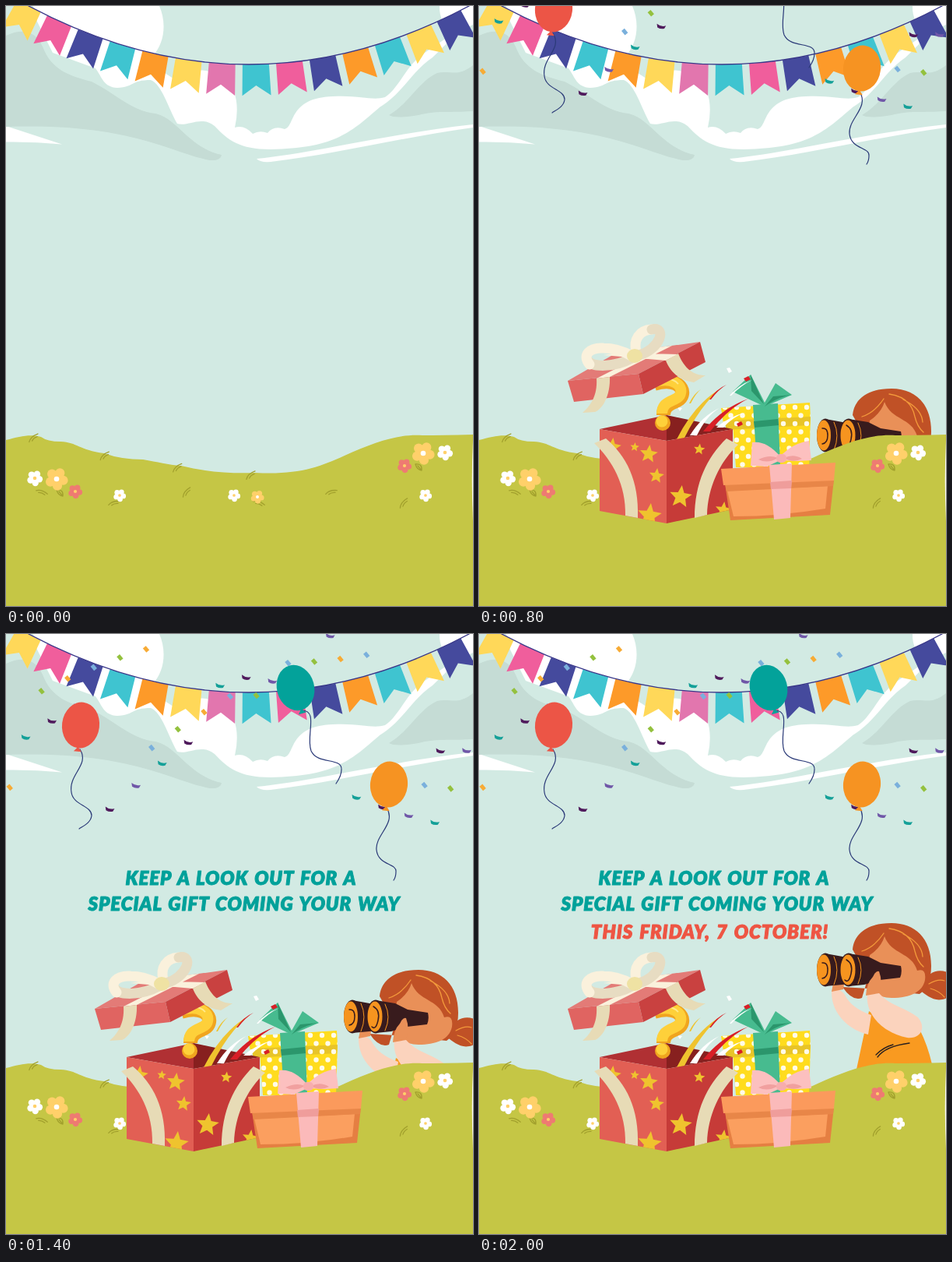
Write an HTML page that moves like this. It is 600 by 770 pixels and loops after 4000 ms.

```html
<!DOCTYPE html>
<html lang="en">
<head>
<meta charset="utf-8">
<title>Gift invitation</title>
<style>
html, body { margin: 0; height: 100%; overflow: hidden; background: #d2eae3; }
svg { display: block; width: 100vw; height: 100vh; }
text { font: italic 900 24px Lato, "Open Sans", sans-serif; letter-spacing: .95px; word-spacing: 2px; text-anchor: middle; stroke-width: 1; stroke-linejoin: round; }
.line { fill: none; stroke-linecap: round; stroke-linejoin: round; }
</style>
</head>
<body>
<svg viewBox="0 0 600 770">
  <defs>
    <clipPath id="boxClip"><path d="M155 543L241 558 326 543V646L241 664 155 648Z"/></clipPath>
    <clipPath id="wrapClip"><path d="M311 516L425 509 426 528 424 592H330L326 536H314Z"/></clipPath>
  </defs>

  <!-- sky -->
  <path fill="#d2eae3" d="M0 0H600V770H0Z"/>
  <g fill="#fff">
    <path d="M35 0H197C206 20 205 48 187 66Q195 82 215 93C240 75 283 80 293 110Q300 130 294 156Q306 152 317 164Q326 159 336 163Q344 153 358 158C372 155 362 118 420 116C455 114 470 122 487 117C505 105 512 80 535 62L600 18V24C580 32 565 50 548 66C520 85 510 112 480 130C440 165 420 182 340 184C300 184 285 172 268 154C250 140 235 155 220 151C208 130 200 100 186 95C160 95 165 104 143 105C125 104 124 92 115 80L60 60 40 20Z"/>
    <path d="M557 0Q556 20 575 38L600 22V0Z"/>
    <path d="M0 154L72 177.500Q36 174 0 174.500Z"/>
    <path d="M322 196C400 188 490 164 600 152V156C500 170 420 191 340 200Q326 201 322 196Z"/>
  </g>
  <g fill="#c5dcd5">
    <path d="M0 38C22 28 38 32 47 52C58 82 82 90 110 97C140 112 162 135 192 138C220 144 235 182 277 191Q276 199 262 198C210 188 160 150 0 155Z"/>
    <path d="M492 140C515 128 532 95 554 86C572 82 580 92 600 76V135C570 137 552 134 530 140Q500 145 492 140Z"/>
  </g>
  <g id="bunting"></g>

  <g id="girl">
    <path fill="#c05126" d="M570 449C576 434 590 429 601 434V467C586 474 576 464 566 457Z"/>
    <path class="line" stroke="#f39a3b" stroke-width="1.200" d="M578 449Q590 442 598 445M580 455Q591 458 598 466"/>
    <path fill="#c05126" d="M467 453Q480 472 492 467L500 440 480 405C482 384 500 371 530 371C560 371 581 390 581 426Q581 452 566 462L500 455Z"/>
    <path fill="#e99058" d="M502 412Q517 402 521 388C530 412 556 408 563 432Q575 428 573 444C570 459 555 467 530 467Q500 466 499 440Z"/>
    <path class="line" stroke="#f39a3b" stroke-width="1.300" d="M520 384Q508 402 492 407M527 378Q555 382 560 407Q563 420 571 427M545 385Q569 397 570 414"/>
    <path fill="#f99a20" d="M501 484Q525 500 562 500Q575 522 582 552V610H474Z"/>
    <path class="line" stroke="#29201f" stroke-width="1.300" d="M512 543Q522 529 553 525M510 540Q520 530 532 527"/>
    <g fill="#fbd3bd">
      <path d="M453 458Q463 453 470 463Q478 480 504 489L500 514C478 509 452 489 453 458Z"/>
      <path d="M499 460Q508 453 514 461C528 477 545 478 564 492C575 505 568 520 550 518C524 513 495 492 499 460Z"/>
    </g>
    <path fill="#e99058" d="M453 459L456 444H470L468 456Z"/>
    <g fill="#381b1d">
      <path d="M445 410L467 414 490 425V446L467 450 445 452Z"/>
      <path d="M475 410L500 414 516 422 542 426Q544 434 541 441L515 444 495 450 475 452Z"/>
      <ellipse cx="445" cy="431" rx="11" ry="21.500"/>
      <ellipse cx="475" cy="431" rx="12" ry="21.500"/>
    </g>
    <g fill="#f6941f">
      <ellipse cx="443" cy="431" rx="9" ry="19.500"/>
      <ellipse cx="474" cy="431" rx="9.500" ry="19.500"/>
    </g>
    <path class="line" stroke="#381b1d" stroke-width="1.500" d="M441 422Q448 421 448 431T441 442M472 418Q481 423 478 436T470 444"/>
    <path class="line" stroke="#f6941f" d="M456 414Q464 431 456 450M487 415Q495 431 487 449"/>
    <path fill="#e99058" d="M497 464Q498 448 506 440Q510 431 514 433Q519 446 514 461Z"/>
  </g>

  <!-- meadow -->
  <path id="hill" fill="#c5c645" d="M0 557C18 552 32 549 45 553Q53 559 70 559C92 560 94 570 126 574Q148 582 176 582C195 585 208 589 225 590C258 598 288 600 320 599C375 602 402 592 435 577C475 559 505 549 535 551Q560 551 600 550V770H0Z"/>
  <path fill="#fff" d="M600 557Q597.500 608 600 661Z"/>
  <g id="meadow"></g>

  <g id="gifts">
    <!-- yellow parcel -->
    <path fill="#ffdc1e" d="M311 516L425 509 426 528 424 592H330L326 536H314Z"/>
    <path fill="#e8c428" d="M315 532L426 527 425 538 318 544Z"/>
    <g id="dots" clip-path="url(#wrapClip)"></g>
    <path fill="#47bb8f" d="M352 512L384 510 387 590H357Z"/>
    <path fill="#2b966c" d="M353 533L384 530 385 538 354 541Z"/>
    <path fill="#47bb8f" d="M349 473L326 495 367 514 402 499 381 484 367 509Z"/>
    <path fill="#2b966c" d="M349 473L350 494 366 511ZM402 499Q383 502 367 514L378 501Z"/>

    <!-- open box -->
    <path fill="#b03033" d="M155 543L241 525V558Z"/>
    <path fill="#87201f" d="M241 525L326 543 241 558Z"/>
    <g id="streamers"></g>
    <g class="line" style="stroke-linecap: butt">
      <path stroke="#f0a51f" stroke-width="18" d="M225 485C250 477 263 488 261 498C259 511 237 506 237 525"/>
      <path stroke="#fed03a" stroke-width="14" d="M224 483C249 475 262 487 259 497C257 508 235 504 235 523"/>
      <path stroke="#ffe98a" stroke-width="2" d="M229 479Q246 475 256 485"/>
    </g>
    <circle cx="236" cy="535" r="10" fill="#f0a51f"/>
    <circle cx="235" cy="533" r="7.500" fill="#fed03a"/>
    <path fill="#e25f54" d="M155 543L241 558V664L155 648Z"/>
    <path fill="#c63b38" d="M241 558L326 543V646L241 664Z"/>
    <g id="stars" fill="#efc32e" clip-path="url(#boxClip)"></g>
    <g fill="#e7dbb6">
      <path d="M148 561L163 555C189 577 206 609 204 657L188 654C189 615 172 584 148 561Z"/>
      <path d="M333 563L318 555C293 579 277 612 277 657L293 653C294 618 309 585 333 563Z"/>
    </g>

    <!-- lid -->
    <path fill="#e37b77" d="M114 481L175 446 284 431 205 472Z"/>
    <path fill="#e06461" d="M114 481L205 472 211 498 122 508Z"/>
    <path fill="#c94140" d="M205 472L284 431 291 457 211 498Z"/>
    <path fill="#faf1dc" d="M151 478L230 438 248 436 168 476ZM160 448L178 445 256 447 240 455Z"/>
    <g fill="#e7dbb6">
      <path d="M151 478L168 476C169 500 159 517 149 521L133 522C148 509 152 494 151 478Z"/>
      <path d="M240 455L256 446C264 466 276 474 291 474L276 483C257 480 246 470 240 455Z"/>
    </g>
    <g class="line" stroke-width="13">
      <path stroke="#e7dcc2" d="M196 452C174 464 145 464 140 455"/>
      <path stroke="#faf1dc" d="M142 460C132 448 142 438 160 439Q178 439 196 449"/>
      <path stroke="#faf1dc" d="M202 444C198 428 206 416 222 415"/>
      <path stroke="#e7dcc2" d="M222 415C242 411 233 440 206 448"/>
    </g>
    <ellipse cx="200" cy="449" rx="10" ry="9" fill="#efe2a3"/>

    <!-- orange parcel -->
    <path fill="#e57f42" d="M316 613L456 607 451 653 323 660Z"/>
    <path fill="#fb9f5f" d="M319 622L448 616 445 645Q385 655 327 655Z"/>
    <path fill="#e88648" d="M316 613L456 606 455 616 318 623Z"/>
    <path fill="#fb9a5c" d="M311 594L458 586 456 609 314 615Z"/>
    <path fill="#fbbaba" d="M373 589L402 587 400 657 379 659Z"/>
    <path fill="#ef9d9b" d="M374 611L402 609 401 619 375 620Z"/>
    <path fill="#fcc0bf" d="M387 578Q369 557 351 560L349 590 370 591 387 583 410 584 427 583 424 558Q403 561 387 578Z"/>
    <path fill="#f1a09f" d="M359 582Q373 575 384 580Q371 588 359 582ZM392 580Q404 574 415 581Q403 587 392 580Z"/>
    <rect x="382" y="575" width="13" height="11" rx="5" fill="#f7adad"/>
  </g>

  <g id="air"></g>

  <g id="invite" fill="#00a19a" stroke="#00a19a">
    <text x="302" y="321.500">KEEP A LOOK OUT FOR A</text>
    <text x="306" y="354.500">SPECIAL GIFT COMING YOUR WAY</text>
  </g>
  <g id="date" fill="#ee5543" stroke="#ee5543">
    <text x="296.500" y="390.500">THIS FRIDAY, 7 OCTOBER!</text>
  </g>
</svg>
<script>
const $ = id => document.getElementById(id);
const fill = (id, parts) => { $(id).innerHTML = parts.flat().join(''); };
const times = (n, make) => Array.from({ length: n }, (_, i) => make(i));
const path = (d, attrs) => `<path d="${d}" ${attrs}/>`;
const at = (x, y, turn = 0) => `transform="translate(${x} ${y}) rotate(${turn})"`;
const dot = (x, y, r, color) => `<circle cx="${x}" cy="${y}" r="${r}" fill="${color}"/>`;
const frac = v => v - Math.floor(v);

// Bunting: flags evenly spaced along a parabola, each turned to its slope.
const [gold, pink, indigo, aqua, orange, orchid] = ['#ffd859', '#f05e9c', '#454a9d', '#3fc4d0', '#fd9a29', '#e276ae'];
const flags = [gold, pink, indigo, aqua, orange, gold, orchid, aqua, pink, indigo, orange, aqua, gold, indigo];
const half = 283;
fill('bunting', [
  flags.map((color, i) => {
    const k = i - 6.5, x = 299.3 + 43.2 * k - 0.04 * k ** 3, u = (x - 312) / half;
    const turn = Math.atan(-150 * u / half) * 180 / Math.PI;
    return path('M-17 0H17L19 40 0 27-18 40Z', `fill="${color}" ${at(x, 75 * (1 - u * u), turn)}`);
  }),
  path(`M${312 - half} 0q${half} 150 ${2 * half} 0`, 'class="line" stroke="#373588" stroke-width="1.400"')
]);

const white = '#fff', yellow = '#ffd06a', coral = '#ee7b72';
const flower = (x, y, r, petal, heart = yellow) => [
  ...times(5, i => {
    const a = i * Math.PI * 0.4 + 0.2;
    return dot(x + Math.cos(a) * r * 0.6, y + Math.sin(a) * r * 0.6, r * 0.42, petal);
  }),
  dot(x, y, r * 0.45, petal), dot(x, y, r * 0.23, heart)
];
const blade = (d, x, y, turn) =>
  path(d, `class="line" stroke="#a2a02d" stroke-width="1.300" ${at(x, y, turn)}`);
const tuft = (x, y, turn) => blade('M-7 3Q-3-3 7-3M-3 3Q0 0 5 0', x, y, turn);
const cluster = (x, y, side) => [
  blade('M-5-4Q4-5 3 4Q-3 3-5-4M-2-2L3 4', x + 5 * side, y + 18),
  flower(x, y, 14.5, yellow, white),
  flower(x - 28 * side, y - 1, 10, white),
  flower(x + 24 * side, y + 16, 9, coral)
].flat();
fill('meadow', [
  times(4, i => {
    const p = $('hill').getPointAtLength(36 + 95 * i);
    return tuft(p.x, p.y + 3, -20);
  }),
  times(6, i => tuft(46 + 93 * i, 624 + 14 * (i % 2), 40 - 35 * (i % 3))),
  cluster(65, 607, 1), cluster(536, 574, -1),
  [146, 293, 539].map(x => flower(x, 628, 8, white)).flat(),
  flower(323, 630, 8.5, yellow, white)
]);

// Polka dots on a staggered grid
fill('dots', times(8, row => times(8, col =>
  dot(316 + 15 * col + 7.5 * (row % 2), 515 + 10.5 * row, 3.2, '#fffbe8'))).flat());

const star = ([x, y, r]) => `<polygon points="${times(10, i => {
  const a = i * Math.PI / 5 - 1.45, k = i % 2 ? r * 0.45 : r;
  return [x + k * Math.cos(a), y + k * Math.sin(a)];
}).join(' ')}"/>`;
fill('stars', [[171, 566, 12], [200, 566, 6], [218, 575, 12], [228, 603, 10], [219, 654, 16],
  [283, 569, 7.5], [259, 630, 15], [314, 647, 11]].map(star));

// Streamers: crescents fanning out of the box, in two rows
const red = '#d81f27', amber = '#efc32e';
const crescent = (x, y, dx, dy, w, color) => path(
  `M${x} ${y}q${dx * 0.4} ${dy * 0.7} ${dx} ${dy}q${-dx * 0.45} ${-dy * 0.3} ${w - dx} ${-dy}z`, `fill="${color}"`);
fill('streamers', [
  [amber, white, red, white].map((color, i) => {
    const reach = color === white ? 0.65 : 1;
    return crescent(254 + 17 * i, 556 - 5 * i, 58 * reach, (12 * i - 66) * reach, 9, color);
  }),
  [amber, red, white].map((color, i) => crescent(270 + 26 * i, 510 - 5 * i, 15 + 7 * i, -18 - i, 2, color)),
  path('M318 465l4-1 3 5-4 2zM255 515l6 1-3 4z', `fill="${white}"`),
  path('M340 478l6-3 3 4-6 3zM331 536l6-3 2 4-6 3z', `fill="${red}"`)
]);

// Confetti reaches lower towards both sides, leaving the middle free.
const confettiColors = ['#f7ab35', '#14a098', '#94c13e', '#7057a8', '#7ab0dc', '#4f1a5c'];
const confetti = times(36, i => {
  const x = 600 * frac(i * 0.618 + 0.3);
  const y = (115 + 0.67 * Math.abs(x - 300)) * frac(i * 0.7549 + 0.1);
  const shape = i % 2 ? 'M-6-2.500Q0 1 6-2L4.500 2Q0 4-4.500 2Z' : 'M-3.500-2.500h7v5h-7z';
  return path(shape, `fill="${confettiColors[i % 6]}" ${at(x, y, i % 2 ? 10 : 50)}`);
});
const balloon = (x, y, color, tilt, string) =>
  path(string, 'class="line" stroke="#2b3a78" stroke-width="1.200"') +
  `<g fill="${color}" ${at(x, y, tilt)}><ellipse rx="24" ry="29.500"/><path d="M0 28L-5 34H5Z"/></g>`;
fill('air', [
  confetti,
  balloon(96, 117, '#ec5546', 7, 'M95 148C108 168 80 180 84 203C86 220 110 220 110 233C109 242 100 246 94 250'),
  balloon(492, 193, '#f69322', 7, 'M489 223C502 243 474 258 476 277C478 297 502 294 501 305Q501 312 498 316'),
  balloon(372, 69, '#03a29a', -15, 'M380 98C402 98 385 130 392 150C400 168 432 158 431 174Q431 182 424 192')
]);

// Held keys: [start time, value]
const giftKeys = [[500, [9, 187]], [600, [9, 93]], [800, [0, 0]]];
const girlKeys = [[500, [0, 150]], [600, [0, 140]], [800, [0, 120]], [1000, [0, 90]], [1200, [0, 75]],
  [1400, [0, 60]], [1600, [0, 20]], [1800, [0, 0]]];
const airKeys = [[800, [0, -113]], [1000, [0, 0]]];
const place = (id, keys, t) => {
  const key = keys.findLast(([start]) => start <= t);
  $(id).setAttribute('visibility', key ? 'visible' : 'hidden');
  if (key) $(id).setAttribute('transform', `translate(${key[1]})`);
};
const begin = performance.now();
function draw(now) {
  const t = Math.max(0, now - begin) % 4000;
  place('gifts', giftKeys, t);
  place('girl', girlKeys, t);
  place('air', airKeys, t);
  const shown = t < 1000 ? 0 : t < 1200 ? 0.55 : 1;
  const blinkOff = t >= 1200 && t < 2000 && Math.floor(t / 200) % 2;
  $('invite').setAttribute('opacity', shown);
  $('date').setAttribute('opacity', blinkOff ? 0 : shown);
  requestAnimationFrame(draw);
}
draw(begin);
</script>
</body>
</html>
```
